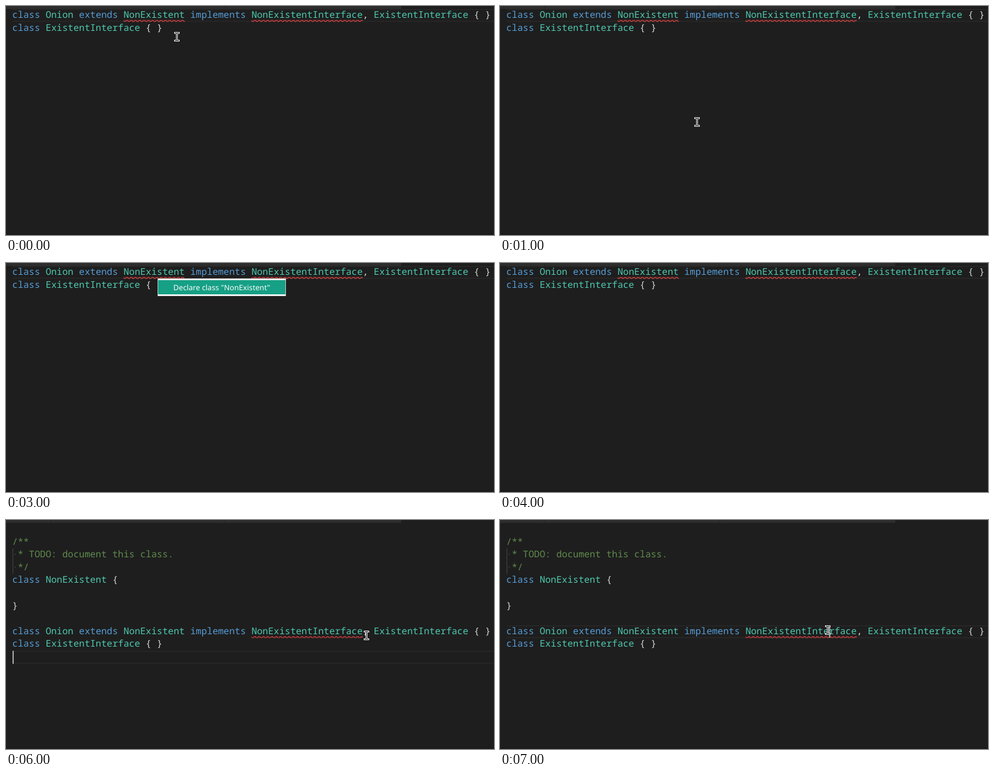
Recreate the animation shown at these times as an HTML page. Size 821 by 387 pixels, loop 8 s.

```html
<!DOCTYPE html>
<html lang="en">
<head>
<meta charset="utf-8">
<title>Declare class</title>
<style>
html, body { margin: 0; width: 100%; height: 100%; overflow: hidden; background: #1e1e1e; }
svg { display: block; width: 821px; height: 387px; }
text {
  font: 15.6px "Noto Sans Mono", "DejaVu Sans Mono", monospace;
  fill: #d4d4d4;
  white-space: pre;
  text-rendering: geometricPrecision;
}
.k { fill: #569cd6; }
.t { fill: #4ec9b0; }
.c { fill: #608b4e; }
.caret { fill: #aeafad; }
.line { fill: #282828; }
.label { font: 12.67px "Noto Sans", "Open Sans", sans-serif; fill: #3b3f43; }

/* Every part switches hard on an 8 s clock. */
.before, .after, .menu, .hot, .label, .stray, .missing, .last, .picked, .mouse {
  animation: 8s step-end infinite;
}
.before  { animation-name: before; }
.after   { animation-name: after; }
.menu    { animation-name: menu; }
.hot     { animation-name: hot; }
.label   { animation-name: label; }
.stray   { animation-name: stray; }
.missing { animation-name: missing; }
.last    { animation-name: last; }
.picked  { animation-name: picked; }
.mouse   { animation-name: mouse; }

@keyframes before  { 0% { opacity: 1 } 62.5%, 100% { opacity: 0 } }
@keyframes after   { 0% { opacity: 0 } 62.5%, 100% { opacity: 1 } }
@keyframes menu    { 0% { opacity: 0 } 25% { opacity: 1 } 50%, 100% { opacity: 0 } }
@keyframes hot     { 0% { opacity: 0 } 37.5% { opacity: 1 } 50%, 100% { opacity: 0 } }
@keyframes label   { 0% { fill: #3b3f43 } 37.5% { fill: #fcfcfc } 50%, 100% { fill: #3b3f43 } }
@keyframes stray   { 0% { opacity: 1 } 75%, 100% { opacity: 0 } }
@keyframes missing { 0% { opacity: 0 } 75%, 100% { opacity: 1 } }
@keyframes last    { 0% { opacity: 1 } 87.5%, 100% { opacity: 0 } }
@keyframes picked  { 0% { opacity: 0 } 87.5%, 100% { opacity: 1 } }
@keyframes mouse {
  0%    { transform: translate(283px, 44px); opacity: 1 }
  12.5% { transform: translate(327px, 188px); opacity: 1 }
  25%   { transform: translate(327px, 188px); opacity: 0 }
  75%   { transform: translate(602px, 187px); opacity: 1 }
  87.5%, 100% { transform: translate(547px, 178px); opacity: 1 }
}
</style>
</head>
<body>
<svg viewBox="0 0 821 387" xmlns="http://www.w3.org/2000/svg">
  <defs>
    <pattern id="wave" width="6" height="3" patternUnits="userSpaceOnUse">
      <path fill="#ea4646" d="M5.5 0 2.5 3H1.1L4.1 0zM4 0 6 2V.6L5.4 0zM0 2 1 3H2.4L0 .6z"/>
    </pattern>
    <g id="border" class="line">
      <rect x="11" width="810" height="1.6"/>
      <rect x="11" y="20" width="810" height="1.6"/>
    </g>
    <text id="onion" x="10.5"><tspan class="k">class</tspan> <tspan class="t">Onion</tspan> <tspan class="k">extends</tspan> <tspan class="t">NonExistent</tspan> <tspan class="k">implements</tspan> <tspan class="t">NonExistentInterface</tspan>, <tspan class="t">ExistentInterface</tspan> { }</text>
    <text id="face" x="10.5"><tspan class="k">class</tspan> <tspan class="t">ExistentInterface</tspan> { }</text>
    <path id="beam" d="M1.5 1.5H4L4.5 2 5 1.5H7.5M4.5 2V14M1.5 14.5H4L4.5 14 5 14.5H7.5"/>
  </defs>

  <rect width="821" height="387" fill="#1e1e1e"/>
  <rect y="384" width="821" height="3" fill="#1b1b1b"/>
  <rect width="665" height="5" fill="#2d2d2d"/>
  <path d="M75.5 0V5M368.5 0V5" stroke="#252526"/>

  <g class="before">
    <use href="#border" y="5"/>
    <use href="#onion" y="20"/>
    <use href="#face" y="42"/>
    <g transform="translate(197.7 23.3) scale(1.2)"><rect width="85.8" height="3" fill="url(#wave)"/></g>
    <g transform="translate(413 23.3) scale(1.2)"><rect width="156" height="3" fill="url(#wave)"/></g>
  </g>

  <g class="after">
    <g class="last"><use href="#border" y="221.2"/></g>
    <g class="picked"><use href="#border" y="178"/></g>
    <rect x="11" y="48" width="1.2" height="43" fill="#404040"/>
    <g fill="#454545"><circle cx="15.2" cy="58" r="1"/><circle cx="15.2" cy="79.5" r="1"/></g>
    <text x="10.5" y="42" class="c">/**</text>
    <text x="10.5" y="63" class="c"> * TODO: document this class.</text>
    <text x="10.5" y="85" class="c"> */</text>
    <text x="10.5" y="106"><tspan class="k">class</tspan> <tspan class="t">NonExistent</tspan> {</text>
    <text x="10.5" y="150">}</text>
    <use href="#onion" y="193"/>
    <use href="#face" y="214"/>
    <g class="stray"><g transform="translate(10.5 239.3) scale(1.2)"><rect width="7.8" height="3" fill="url(#wave)"/></g></g>
    <g class="missing"><g transform="translate(413 196.1) scale(1.2)"><rect width="156" height="3" fill="url(#wave)"/></g></g>
    <rect class="caret last" x="11" y="221" width="2" height="22"/>
    <rect class="caret picked" x="553.5" y="178" width="2" height="21"/>
  </g>

  <g class="menu">
    <rect x="255.5" y="26.5" width="215" height="29" fill="#fff" stroke="#c6c8ca"/>
    <rect class="hot" x="256" y="29" width="214" height="24" fill="#16a085"/>
    <text class="label" x="281.5" y="46">Declare class "NonExistent"</text>
  </g>

  <g class="mouse" fill="none" stroke-linecap="square">
    <use href="#beam" stroke="#fff" stroke-width="3"/>
    <use href="#beam" stroke="#000"/>
  </g>
</svg>
</body>
</html>
```
